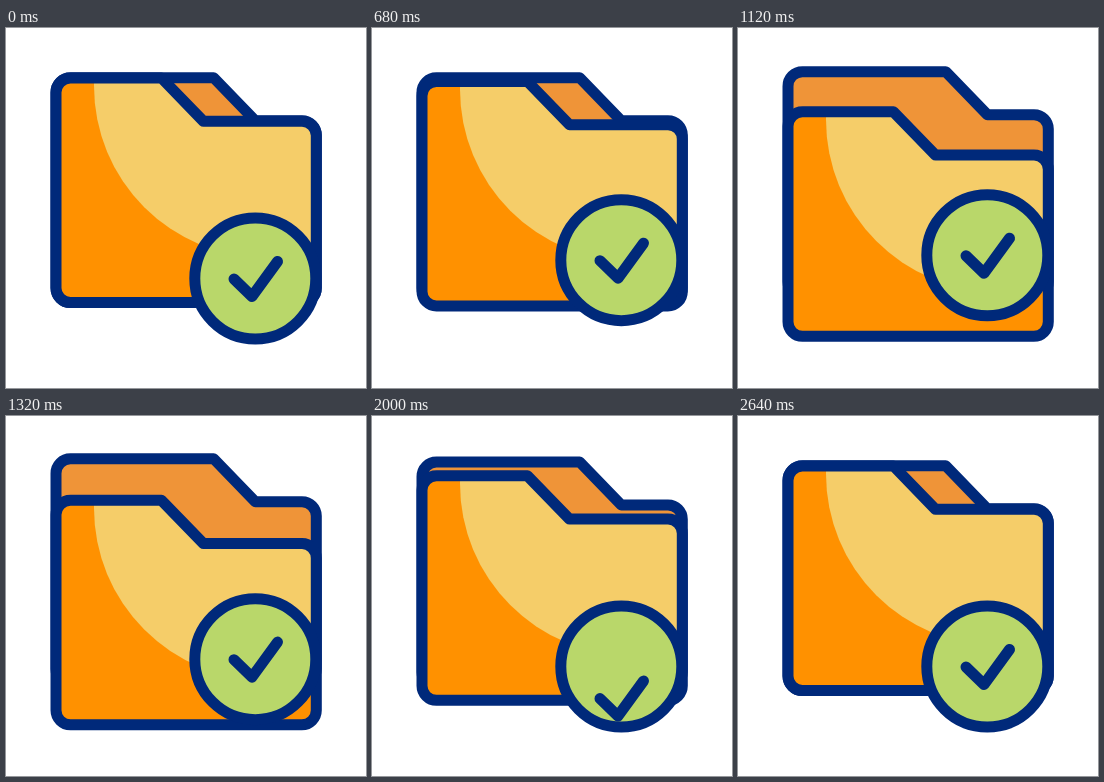
These frames come from a looping animation (360x360 px, 3000 ms). An HTML page:

```html
<!DOCTYPE html>
<html lang="en">
<head>
<meta charset="utf-8">
<title>Folder check</title>
<style>
  html, body { margin: 0; width: 100%; height: 100%; overflow: hidden; background: #fff; }
  svg { display: block; width: 100vw; height: 100vh; }
  .line { fill: none; stroke: #00297a; stroke-width: 11; stroke-linecap: round; stroke-linejoin: round; }
</style>
</head>
<body>
<svg viewBox="0 0 360 360">
  <defs>
    <path id="frontShape" d="M50 64.5A14.5 14.5 0 0 1 64.5 50H155.5L197.5 93.3H296A14.3 14.3 0 0 1 310.3 107.6V260A14.5 14.5 0 0 1 295.8 274.5H64.5A14.5 14.5 0 0 1 50 260Z"/>
    <path id="backShape" d="M50 64.5A14.5 14.5 0 0 1 64.5 49.8H207.7L249.3 92.8H296A14.3 14.3 0 0 1 310.3 107.1V260A14.5 14.5 0 0 1 295.8 274.5H64.5A14.5 14.5 0 0 1 50 260Z"/>
    <clipPath id="frontClip"><use href="#frontShape"/></clipPath>
    <clipPath id="badgeClip"><circle cx="249.3" cy="250.5" r="58"/></clipPath>
  </defs>
  <g id="back">
    <use href="#backShape" fill="#ef9438"/>
    <use href="#backShape" class="line"/>
  </g>
  <g id="front">
    <use href="#frontShape" fill="#ff9100"/>
    <g clip-path="url(#frontClip)"><circle cx="259.5" cy="58" r="171.5" fill="#f5cd69"/></g>
    <use href="#frontShape" class="line"/>
  </g>
  <g id="badge">
    <circle cx="249.3" cy="250.5" r="60.5" fill="#b9d76a"/>
    <g clip-path="url(#badgeClip)">
      <path id="check" class="line" d="M228 251L246 268.5L271.5 233.5"/>
    </g>
    <circle class="line" cx="249.3" cy="250.5" r="60.5"/>
  </g>
</svg>
<script>
  const LOOP = 3000;

  // Vertical moves per part: [start ms, end ms, from, to]
  const moves = {
    back:  [[650, 1250, 0, -7], [1720, 2320, -7, 0]],
    front: [[563, 1163, 0, 34.3], [1600, 2220, 34.3, 0]],
    badge: [[370, 930, 0, -31.5], [930, 1500, -31.5, 0]],
    check: [[1605, 2145, 0, -180]]
  };
  const parts = Object.keys(moves).map(id => [document.getElementById(id), moves[id]]);

  const ease = p => p * p * (3 - 2 * p);

  function offset(steps, t) {
    let y = 0;
    for (const [start, end, from, to] of steps) {
      if (t >= start) y = from + (to - from) * ease(Math.min(1, (t - start) / (end - start)));
    }
    return y < -90 ? y + 180 : y; // the tick leaves at the top and returns from below
  }

  function draw() {
    const t = performance.now() % LOOP;
    for (const [el, steps] of parts) {
      el.setAttribute("transform", `translate(0 ${offset(steps, t).toFixed(2)})`);
    }
    requestAnimationFrame(draw);
  }
  draw();
</script>
</body>
</html>
```
